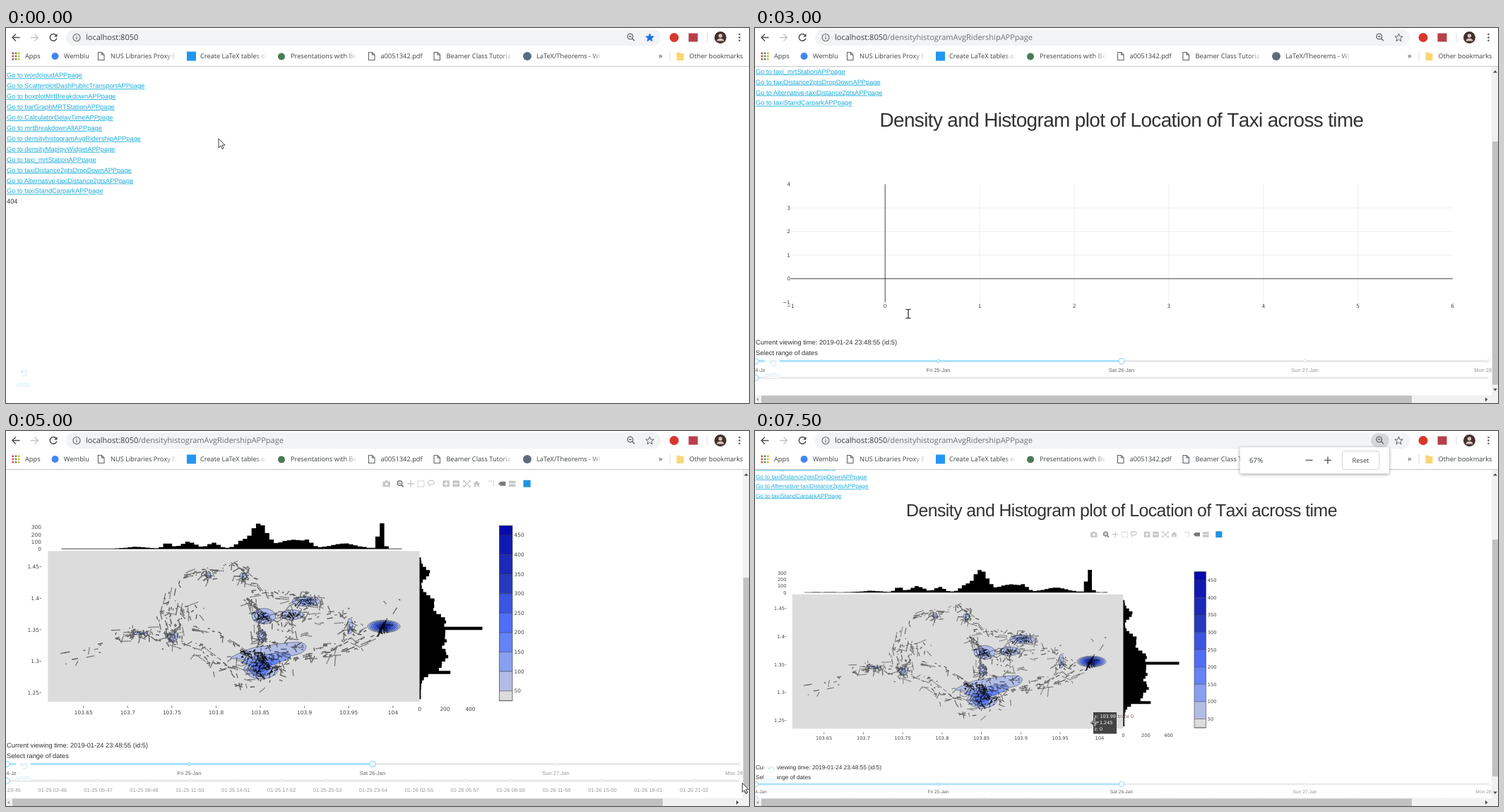
Animation, 1052 px wide and 532 px high, one loop 8000 ms. Source, as an HTML page:

```html
<!DOCTYPE html>
<html lang="en">
<head>
<meta charset="utf-8">
<title>Taxi density dashboard</title>
<style>
  html, body { margin: 0; width: 100%; height: 100%; overflow: hidden; background: #fff; }
  svg { display: block; }
  #stage { width: 100vw; height: 100vh; }
  text { white-space: pre; text-rendering: geometricPrecision; }
  .ui { font-family: "Open Sans", "Noto Sans", sans-serif; font-size: 9.25px; fill: #3c4043; }
  .body { font-family: "Liberation Sans", Arial, sans-serif; font-size: 9.3px; fill: #323232; }
  .link { fill: #1eaedb; text-decoration: underline; }
  .title { font-size: 27.9px; letter-spacing: -.62px; font-kerning: none; text-anchor: middle; }
  .tick { font-family: "DejaVu Sans", Verdana, sans-serif; font-size: 7.44px; fill: #444; }
  .mark { font-size: 7.5px; fill: #999; text-anchor: middle; }
  .mid { text-anchor: middle; }
  .end { text-anchor: end; }
</style>
</head>
<body>
<svg id="stage" viewBox="0 0 1052 532" xmlns="http://www.w3.org/2000/svg">
  <rect width="1052" height="532" fill="#fff"/>
  <svg id="page" y="55" width="1052" height="477" viewBox="0 55 1052 477"></svg>
  <g id="bars"></g>
  <g id="chrome"></g>
  <g id="top"></g>
</svg>
<script>
const LOOP = 8000;
const PATH = '/densityhistogramAvgRidershipAPPpage';
const el = id => document.getElementById(id);
const range = (n, fn) => Array.from({ length: n }, (_, i) => fn(i)).join('');

const text = (x, y, str, cls = 'ui', extra = '') =>
  `<text x="${x}" y="${y}" class="${cls}" ${extra}>${str}</text>`;
const rect = (x, y, w, h, fill, extra = '') =>
  `<rect x="${x}" y="${y}" width="${w}" height="${h}" fill="${fill}" ${extra}/>`;
const oval = (x, y, rx, ry, fill, extra = '') =>
  `<ellipse cx="${x}" cy="${y}" rx="${rx}" ry="${ry}" fill="${fill}" ${extra}/>`;
const circle = (x, y, r, fill, extra) => oval(x, y, r, r, fill, extra);
const path = (d, fill, stroke = 'none', width = 1, extra = '') =>
  `<path d="${d}" fill="${fill}" stroke="${stroke}" stroke-width="${width}" ${extra}/>`;
const line = (d, stroke, width = 1, extra = '') => path(d, 'none', stroke, width, extra);
const group = (transform, body) => `<g transform="${transform}">${body}</g>`;

// ---------- density plot ----------
let seed = 20190124;
function random() {
  seed = (seed + 0x6D2B79F5) | 0;
  let t = Math.imul(seed ^ (seed >>> 15), 1 | seed);
  t = (t + Math.imul(t ^ (t >>> 7), 61 | t)) ^ t;
  return ((t ^ (t >>> 14)) >>> 0) / 4294967296;
}
const gauss = () => (random() + random() + random() - 1.5) * 2;

// A taxi leaves a short straight run of dots.
function trip(x, y, angle) {
  const gap = .7 + random() * 1.8;
  return range(1 + Math.floor(random() * 7), i =>
    `M${(x + Math.cos(angle) * gap * i).toFixed(1)} ${(y + Math.sin(angle) * gap * i).toFixed(1)}h0`);
}
const cloud = (n, x, y, sx, sy) =>
  range(n, () => trip(x + gauss() * sx, y + gauss() * sy, random() * Math.PI));

function road(n, jitter, ...stops) {
  return range(n, () => {
    const u = random() * (stops.length - 1), i = Math.floor(u), f = u - i;
    const [[x0, y0], [x1, y1]] = [stops[i], stops[i + 1]];
    const angle = random() < .6 ? Math.atan2(y1 - y0, x1 - x0) : random() * Math.PI;
    return trip(x0 + (x1 - x0) * f + gauss() * jitter, y0 + (y1 - y0) * f + gauss() * jitter, angle);
  });
}
const dots = (d, opacity) =>
  line(d, '#000', 1.7, `stroke-linecap="round" stroke-opacity="${opacity}"`);

const colours = [[0, 220, 220, 220], [.3, 106, 137, 247], [.5, 70, 100, 245], [.65, 40, 60, 190], [1, 5, 10, 172]];
function level(i) {
  const v = i / 9, k = Math.max(1, colours.findIndex(c => c[0] >= v));
  const [a, b] = [colours[k - 1], colours[k]], f = (v - a[0]) / (b[0] - a[0]);
  return `rgb(${[1, 2, 3].map(c => Math.round(a[c] + (b[c] - a[c]) * f))})`;
}

// Hotspots: x, y, radii, number of contour levels.
const airport = [535, 370.5, 23, 8.8, 9];
const hotspots = [[365, 356, 17, 11, 2], [405, 354, 16, 7, 1], [425, 335, 20, 7, 2], [362, 384, 6, 9, 1],
  [487, 370, 4, 11, 1], [236, 385, 8, 6, 1], [189, 380, 11, 2, 1], [286, 298, 4, 3, 1], [336, 299, 5, 5, 1]];
const edge = 'stroke="#1c2440" stroke-width=".5"';
const rings = ([x, y, rx, ry, n]) => range(n, i =>
  oval(x, y, rx * (1 - i / n), ry * (1 - i / n), level(i + 1), edge));
const city = 'M318 415C340 402 352 400 362 399S395 393 412 393S428 404 416 409S378 414 380 422' +
  'S391 432 379 440S350 446 341 438S340 428 342 422S326 418 318 415Z';
const downtown = [1, .66, .42, .25].map((s, i) =>
  group(`translate(360 428) scale(${s}) translate(-360 ${-428 + i * 4})`, path(city, level(i + 1), '#1c2440', .5 / s))).join('');
const contours = downtown + [...hotspots, airport].map(rings).join('');

const streets =
  hotspots.map(([x, y, rx, ry]) => cloud(18 + rx, x, y, rx * .5 + 4, ry * .5 + 2)).join('') +
  road(50, 3.5, [245, 304], [268, 294], [295, 294], [320, 280], [340, 294], [354, 312]) +
  road(50, 8, [235, 325], [230, 350], [236, 380]) + cloud(20, 259, 348, 8, 8) +
  road(12, 6, [80, 412], [150, 398]) + road(30, 5, [155, 382], [205, 380]) +
  road(75, 6, [205, 382], [265, 400], [300, 425], [352, 440]) +
  road(35, 2, [235, 365], [300, 381], [350, 412]) +
  road(50, 3, [336, 330], [354, 345], [362, 384], [360, 408]) +
  road(35, 4, [340, 330], [375, 324], [440, 330]) +
  road(75, 6, [375, 404], [405, 404], [460, 400], [500, 378], [480, 355], [425, 360]) +
  road(45, 2.5, [380, 424], [430, 413], [470, 410], [524, 388]) +
  cloud(50, 385, 378, 24, 15) + cloud(60, 360, 425, 20, 13) + cloud(3, 545, 343, 8, 6) + cloud(8, 332, 450, 9, 6);
const busy =
  road(75, 3, [330, 408], [365, 412], [350, 438], [374, 432], [360, 415]) +
  road(35, .7, [526, 384], [531, 374], [536, 366]) +
  [...hotspots.slice(0, 3)].map(([x, y, rx, ry]) => cloud(9, x, y, rx * .4, ry * .3)).join('');
const scatter = dots(streets, .55) + dots(busy, .85);

// Histograms are sums of bell curves: centre, height, width.
const bells = (at, base, peaks) =>
  (base + peaks.reduce((sum, [m, h, w]) => sum + h * Math.exp(-(((at - m) / w) ** 2)), 0)) * (.92 + random() * .16);
const columns = range(77, i => {
  const x = 78.5 + i * 6.26;
  const h = bells(x + 3.1, .7, [[185, 2.2, 20], [229, 8, 8], [259, 9.5, 14], [294, 8, 11], [334, 9, 12],
    [359, 33, 16], [404, 13, 20], [427, 8, 10], [478, 7, 26], [530.6, 41, 5]]);
  return `M${x} 260.700v${-h}h6.400v${h}z`;
});
const rows = range(45, i => {
  const y = 272.6 + i * 4.47;
  const w = bells(y + 2.2, 2, [[295, 13, 9], [335, 18, 12], [360, 30, 14], [373.2, 52, 2.5],
    [386, 35, 16], [412, 33, 13], [430, 20, 12], [435.8, 26, 2.5]]);
  return `M585.500 ${y}h${w}v4.600h${-w}z`;
});

const filledPlot = (() => {
  let out = rect(59.3, 263.5, 526.2, 214, '#dcdcdc') + contours + scatter + path(columns + rows, '#000');
  out += range(4, i => text(50, 263.3 - i * 10.2, i * 100, 'tick end'));
  out += range(5, i => text(47, 288.7 + i * 44.6, +(1.45 - i * .05).toFixed(2), 'tick end') +
    line(`M47.500 ${286 + i * 44.6}h2.500`, '#444', .7));
  out += range(8, i => {
    const x = 109.7 + i * 62.6;
    return line(`M${x} 483v3.500`, '#444', .7) + text(x, 495, +(103.65 + i * .05).toFixed(2), 'tick mid');
  });
  out += range(3, i => text(585.5 + i * 36, 490.6, i * 200, 'tick mid'));
  out += range(10, i => {
    const top = Math.max(227.5, 462 - i * 27.6), bottom = Math.min(476, 489.6 - i * 27.6);
    return rect(698.5, top, 18.5, bottom - top, level(i)) + line(`M698.500 ${bottom}h18.500`, '#222', .5);
  });
  out += rect(698.5, 227.5, 18.5, 248.5, 'none', 'stroke="#444" stroke-width=".7"');
  return out + range(9, i => text(719.5, 464.6 - i * 27.6, 50 + i * 50, 'tick'));
})();

const emptyPlot = (() => {
  const X = v => 184.2 + v * 133.9, Y = v => 355.7 - v * 33.5;
  const label = v => String(v).replace('-', '−');
  return range(5, i => line(`M${X(i + 1)} 221.500v167.500`, '#eee')) +
    range(3, i => line(`M50.300 ${Y(i + 1)}h937.500`, '#eee')) +
    line(`M${X(0)} 221.500v167.500M50.300 ${Y(0)}h937.500`, '#444') +
    range(6, i => text(50, Y(i - 1) + 2.7, label(i - 1), 'tick end')) +
    range(8, i => text(X(i - 1), 397.3, label(i - 1), 'tick mid'));
})();

// ---------- page content ----------
const iconBar = (() => {
  const grey = '#c6c6c6', dark = '#7b7b7b', y = 168;
  const cross = (x, r) => `M${x - r} ${y}h${2 * r}M${x} ${y - r}v${2 * r}`;
  const plate = (x, d) => rect(x - 5, y - 4.5, 9.5, 9, grey, 'rx="1"') + line(d, '#fff', 1.5);
  return path('M533.5 165h2.5l1-1.5h3.5l1 1.5h2.5v7.5h-10.5z', grey) + circle(538.8, 168.5, 2, '#fff') +
    circle(557.5, 167.3, 3.2, 'none', `stroke="${dark}" stroke-width="1.6"`) +
    line('M560 170l2.5 2.7', dark, 1.9) + line('M556 167.3h3', dark) +
    line(cross(573, 4.7), grey, 1.4) +
    rect(583, 164, 9, 8.5, 'none', `stroke="${grey}" stroke-width="1.2" stroke-dasharray="1.5 1"`) +
    oval(602, 166.5, 4.5, 3, 'none', `stroke="${grey}" stroke-width="1.3"`) + line('M598.5 169q2 1 0 4', grey) +
    plate(623.5, cross(623.3, 3)) + plate(637.5, 'M634 168h6') +
    line('M648 164l9 8.5M657 164l-9 8.5', grey, 1.2) +
    line('M647.5 166v-2.5h2.5M655 163.500h2.500v2.5M657.500 170v2.5h-2.5M650 172.5h-2.5v-2.5', grey) +
    path('M661.5 168.5l5-4.7 5 4.7h-1.5v4h-2.5v-3h-2v3h-2.5v-4z', grey) +
    line('M683 164.5h7v8', grey, 1.2, 'stroke-dasharray="2 1"') +
    path('M697 168l3-3h7.5v6h-7.5z', dark) +
    rect(712, 164, 9.5, 3.6, grey) + rect(712, 168.8, 9.5, 3.6, grey) +
    rect(732.5, 163, 10.2, 10, '#2094e4');
})();

const linkNames = ['wordcloud', 'ScatterplotDashPublicTransport', 'boxplotMrtBreakdown', 'barGraphMRTStation',
  'CalculatorDelayTime', 'mrtBreakdownAll', 'densityhistogramAvgRidership', 'densityMapIpyWidget',
  'taxi_mrtStation', 'taxiDistance2ptsDropDown', 'Alternative-taxiDistance2pts', 'taxiStandCarpark'];
const days = ['Thu', 'Fri', 'Sat', 'Sun', 'Mon'];

function timeMark(i) {
  const minutes = Math.round(1425 + i * 181.15), two = n => String(n).padStart(2, '0');
  return `01-${24 + Math.floor(minutes / 1440)} ${two(Math.floor(minutes / 60) % 24)}-${two(minutes % 60)}`;
}

// Sliders keep the full page width at every zoom, so x is divided by the scale.
function sliders(scale, loaded) {
  const X = x => x / scale, blue = '#abe2fb', ringBlue = '#96dbfa', grey = '#e9e9e9';
  const rail = (y, x, fill) => rect(0, y - 1.5, X(x), 3, fill, 'rx="1.5"');
  const ring = (x, y, r, stroke) => circle(X(x), y, r, '#fff', `stroke="${stroke}" stroke-width="1.3"`);
  let out = text(1, 449.3, 'Current viewing time: 2019-01-24 23:48:55 (id:5)', 'body') +
    text(1, 464.3, 'Select range of dates', 'body') +
    rail(472.6, 1038, grey) + rail(472.6, 519, blue) + rail(496.2, 1038, grey);
  out += days.map((day, i) => ring(i * 259.5, 472.6, 1.9, i < 3 ? ringBlue : grey) +
    text(X(i * 259.5), 487.7, `${day} ${24 + i}-Jan`, 'body mark', i < 3 ? 'style="fill:#666"' : '')).join('');
  if (loaded) {
    out += range(16, i => ring(.8 + i * 64.9, 496.2, 1.7, grey) + text(X(.8 + i * 64.9), 511.7, timeMark(i), 'body mark'));
  }
  return out + ring(1, 472.6, 4, ringBlue) + ring(519, 472.6, 4, ringBlue) + ring(1, 496.2, 4, ringBlue);
}

const undo = rect(14, -54, 21, 30, '#fff', 'opacity=".92"') +
  line('M21.5 -48.5v3.5h3.5M22 -45.500a4 4 0 1 1 1.5 4.3', '#cfeaf6', 1.1) +
  text(14.2, -24.6, 'undo', 'body', 'style="fill:#cfeaf6"');

function drawPage(s) {
  let out = linkNames.map((name, i) => text(1, -54.7 + i * 14.92, `Go to ${name}APPpage`, 'body link',
    i === 6 && s.hover ? 'style="fill:#0f8fc0"' : '')).join('');
  if (!s.plot) out += text(1, 124, '404', 'body');
  else out += s.plot === 'empty' ? emptyPlot : filledPlot;
  if (s.icons) out += iconBar;
  if (s.plot) out += group(`translate(0 ${s.plot === 'full' ? 93.3 : 0})`, sliders(s.scale, s.plot === 'full'));
  out = group(`translate(0 ${s.y}) scale(${s.scale})`, out);
  if (s.plot) {
    out += group(`translate(519 ${s.y}) scale(${s.scale})`,
      text(0, 139.5, 'Density and Histogram plot of Location of Taxi across time', 'body title'));
  }
  return out + group(`translate(0 ${s.plot ? 520 : 534}) scale(${s.scale})`, undo);
}

// ---------- browser frame ----------
function drawBars(s) {
  let out = '';
  if (s.plot) {
    const [top, bottom] = s.thumb;
    out += rect(1043, 55, 9, 477, '#f1f1f1') + rect(0, 521, 1043, 11, '#f1f1f1') +
      rect(1044, top, 8, bottom - top, '#c1c1c1') + rect(9, 521.5, 921, 10.5, '#c1c1c1') +
      path('M1045 63.5l3-3.5 3 3.5zM1045 511.5l3 3.5 3-3.5zM1034 524l3.5 3-3.5 3z', '#505050') +
      path('M5 524.5l-3 2.5 3 2.5z', '#a0a0a0');
  }
  if (s.status) {
    const frame = s.plot ? 'stroke="#c8c8c8" stroke-width=".8"' : '';
    out += rect(-1, 515.5, s.status + 1, 18, '#fff', `rx="2" ${frame}`) +
      text(-2, 528, 'localhost:8050' + PATH, 'ui', 'style="font-size:9.42px;fill:#5f6368"');
  }
  return out;
}

const star = 'M' + Array.from({ length: 10 }, (_, i) => {
  const r = i % 2 ? 2.5 : 6, a = i * Math.PI / 5;
  return `${911.5 + r * Math.sin(a)} ${13.9 - r * Math.cos(a)}`;
}).join('L') + 'Z';
const sheet = x => line(`M${x} 34.500h5l3.500 3.500v7.500h-8.500zM${x + 5} 34.500v3.500h3.500`, '#5f6368', 1.1);
const bookmark = (x, right, str) => `<svg x="${x}" y="30" width="${right - x}" height="20">` +
  text(0, 13, str) + rect(right - x - 16, 0, 16, 20, 'url(#fade)') + '</svg>';

function drawChrome(s) {
  const ink = '#5f6368', apps = ['#e0483e', '#3f9d58', '#eda92c', '#4a83e8'];
  return '<linearGradient id="fade"><stop stop-color="#fff" stop-opacity="0"/><stop offset="1" stop-color="#fff"/></linearGradient>' +
    rect(0, 0, 1052, 54, '#fff') + rect(0, 54, 1052, 1, '#c4c6c8') +
    line('M19.5 13.5h-10M14 8.5l-5 5 5 5', '#4a4d51', 1.4) + line('M35 13.5h10M40.5 8.5l5 5-5 5', '#c0c2c5', 1.4) +
    line('M71 10.5a4.8 4.8 0 1 0 .8 4', '#4a4d51', 1.5) + path('M72.5 8v4.5h-4.5z', '#4a4d51') +
    rect(85, 2, 842, 23, '#f1f3f4', 'rx="11.5"') +
    circle(100, 13.5, 5, 'none', `stroke="${ink}" stroke-width="1.1"`) + line('M100 12.8v3.5M100 10.5v1.3', ink, 1.2) +
    text(113, 17.4, 'localhost:8050' + (s.url ? `<tspan fill="#6f7378">${PATH}</tspan>` : ''), 'ui', 'style="font-size:11.03px"') +
    (s.pressed ? rect(872, 3.5, 26, 20, '#d5d7da', 'rx="10"') : '') +
    circle(883.8, 12, 3.8, 'none', `stroke="${ink}" stroke-width="1.3"`) +
    line('M886.5 14.8l3.5 3.5M882 12h3.6', ink, 1.4) +
    path(star, s.url ? 'none' : '#1a73e8', s.url ? ink : '#1a73e8') +
    circle(946, 13.5, 6.5, '#d9372c') + rect(966.5, 7.5, 13, 12, '#b8404a') +
    rect(992.5, 7, 1, 13, '#dadce0') +
    circle(1011.5, 13.5, 8.5, '#43302f') + circle(1011.5, 11, 2.7, '#d8c3ba') +
    path('M1006.5 18.5c0-5 10-5 10 0z', '#d8c3ba') +
    range(3, i => circle(1038.5, 9 + i * 4.4, 1.3, ink)) +
    range(9, i => rect(8.5 + i % 3 * 4.2, 34.5 + Math.floor(i / 3) * 4.2, 2.6, 2.6, apps[(i + Math.floor(i / 3)) % 4])) +
    text(27, 43, 'Apps') + circle(69.5, 40, 5, '#4285f4') + text(82, 43, 'Wemblu') +
    sheet(130.5) + bookmark(148, 241, 'NUS Libraries Proxy E') +
    rect(256, 33.5, 13, 13, '#2196f3') + bookmark(275, 369, 'Create LaTeX tables on') +
    circle(390, 40.5, 5, '#4a7a58') + bookmark(403, 497, 'Presentations with Bea') +
    sheet(513.5) + text(530.5, 43, 'a0051342.pdf') +
    sheet(606) + bookmark(623.5, 717, 'Beamer Class Tutoria') +
    circle(738, 40, 6, '#5d6d80') + bookmark(751, 845, 'LaTeX/Theorems - Wi') +
    text(924, 43, '»', 'ui', 'style="font-size:11px"') + rect(939.5, 33, 1, 14, '#dadce0') +
    path('M949.5 34.5h4l1.5 1.5h4.5v10h-10z', '#f9d774') + text(967.5, 43, 'Other bookmarks');
}

const cursors = {
  arrow: path('M.5 .5v12.8l3-2.8 2 4.6 2.1-.9-2-4.5h4z', '#fff', '#111', .8),
  hand: path('M4 .5c1 0 1.4.6 1.4 1.4v4.3l4.3 1c1 .3 1.5.8 1.5 2v2.8c0 1.5-.9 2.2-1 4h-5.5' +
    'c-.5-2.5-2.9-4-4-6.300-.4-1 .8-1.6 1.6-.8l.4.5v-7.4c0-1 .4-1.5 1.3-1.5z', '#fff', '#111', .9),
  beam: line('M0 .7h2.5l1 .8 1-.8h2.5M3.5 1.5v11M0 13.3h2.5l1-.8 1 .8h2.5', '#111', 1.1),
  cross: line('M0 6h12M6 0v12', '#fff', 1.6) + line('M0 6h12M6 0v12', '#222', .7)
};

const popup = zoom =>
  rect(686.5, 23, 211.5, 37.5, '#fff', 'rx="2" style="filter:drop-shadow(0 1px 2px rgba(0,0,0,.4))"') +
  text(700, 44.7, zoom, 'ui', 'style="font-size:9.8px"') +
  line('M779.5 41.5h10M806 41.5h10M811 36.5v10', '#5f6368', 1.5) +
  rect(831.5, 28.5, 52.5, 26, '#fff', 'rx="3" stroke="#d0d3d7"') + text(857.5, 44.7, 'Reset', 'ui mid');

const tooltip = path('M475 414l4-3.5v-11.5h33v30.5h-33v-12z', '#444') +
  ['x: 103.99', 'y: 1.245', 'z: 0'].map((t, i) =>
    text(480.5, 407.4 + i * 9, t, 'tick', 'style="font-size:6.4px;fill:#fff"')).join('') +
  text(513.5, 407.4, 'trace 0', 'tick', 'style="font-size:6.4px;fill:#6b5a52"');

function drawTop(s) {
  const [kind, x, y] = s.cursor;
  return (s.zoom ? popup(s.zoom) : '') + (s.tip ? tooltip : '') + group(`translate(${x} ${y})`, cursors[kind]);
}

// ---------- timeline: each step changes only what it names ----------
const steps = [
  { at: 0, y: 125, scale: 1, cursor: ['arrow', 300.5, 156.5] },
  { at: 500, cursor: ['hand', 58, 137] },
  { at: 1000, cursor: ['hand', 137.5, 159.5], status: 238, hover: true },
  { at: 1510, url: true },
  { at: 2000, plot: 'empty', thumb: [68, 414], status: 347 },
  { at: 2500, y: 0, thumb: [161, 506], status: 318, hover: false, cursor: ['arrow', 150, 191] },
  { at: 3000, status: 0, cursor: ['beam', 213.5, 398.5] },
  { at: 3500, plot: 'full', thumb: [148, 446], cursor: ['arrow', 279, 479] },
  { at: 4000, icons: true, cursor: ['arrow', 405, 311] },
  { at: 4500, y: -93.3, thumb: [208, 506], cursor: ['arrow', 417, 286] },
  { at: 5000, cursor: ['arrow', 1042, 499] },
  { at: 5510, y: -10.5, thumb: [154, 453], cursor: ['arrow', 747.5, 284.5] },
  { at: 6000, cursor: ['arrow', 778, 282] },
  { at: 6500, zoom: '75%', cursor: ['arrow', 936, 281] },
  { at: 7000, zoom: '67%', pressed: true, y: -2.9, scale: .8905, thumb: [154, 490], cursor: ['arrow', 936, 268] },
  { at: 7500, tip: true, cursor: ['cross', 475, 407] }
];

let shown = -1;
function update(ms) {
  const count = steps.filter(step => step.at <= ms).length;
  if (count === shown) return;
  shown = count;
  const state = Object.assign({}, ...steps.slice(0, count));
  el('page').innerHTML = drawPage(state);
  el('bars').innerHTML = drawBars(state);
  el('chrome').innerHTML = drawChrome(state);
  el('top').innerHTML = drawTop(state);
}

const start = performance.now();
function tick() {
  update((performance.now() - start) % LOOP);
  requestAnimationFrame(tick);
}
tick();
</script>
</body>
</html>
```
